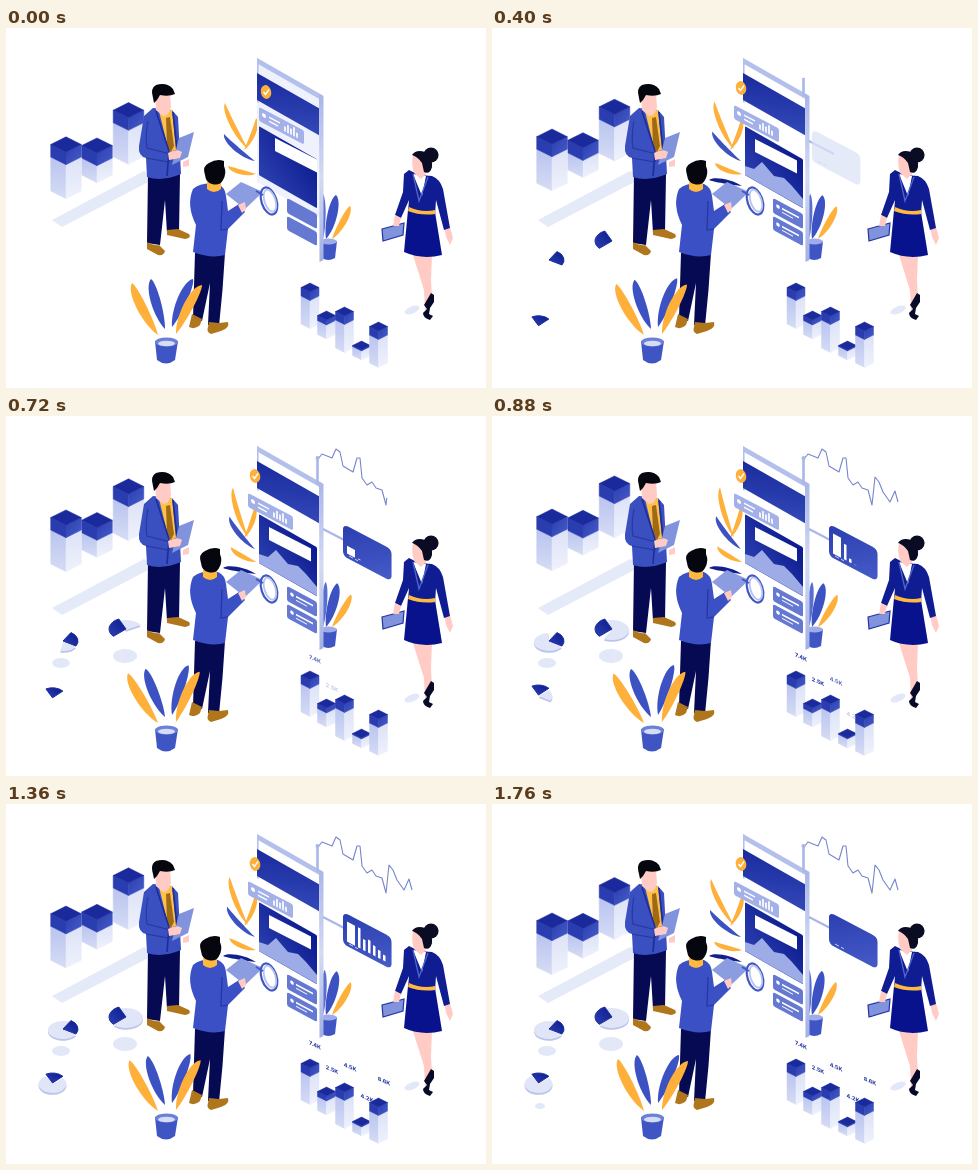
Animation of 480 by 360 pixels, one loop 1840 ms. Source, as an HTML page:

```html
<!DOCTYPE html>
<html lang="en">
<head>
<meta charset="utf-8">
<title>Isometric dashboard</title>
<style>
html,body{margin:0;width:100%;height:100%;overflow:hidden;background:#fff}
svg{display:block;width:100vw;height:100vh}
text{font:bold 5.5px Inter,Arial,sans-serif;fill:#1c2f9f;text-anchor:middle}
</style>
</head>
<body>
<svg viewBox="0 0 480 360">
<defs>
  <linearGradient id="deep" x1="0" y1="0" x2="1" y2="1"><stop stop-color="#1a2b9e"/><stop offset="1" stop-color="#3348b8"/></linearGradient>
  <linearGradient id="deepR" x1="1" y1="0" x2="0" y2="1"><stop stop-color="#0b1a8e"/><stop offset="1" stop-color="#2c40b0"/></linearGradient>
  <linearGradient id="glass" x1="0" y1="0" x2="1" y2="1"><stop stop-color="#2b3eb0"/><stop offset="1" stop-color="#465cc8"/></linearGradient>
  <linearGradient id="post" x1="0" y1="0" x2="0" y2="1"><stop stop-color="#a9b6e8"/><stop offset=".5" stop-color="#d3daf4"/><stop offset="1" stop-color="#a0afe4"/></linearGradient>
  <linearGradient id="side" x1="0" y1="0" x2="0" y2="1"><stop stop-color="#b9c4ef"/><stop offset="1" stop-color="#d6dcf5"/></linearGradient>
  <linearGradient id="sideR" x1="0" y1="0" x2="0" y2="1"><stop stop-color="#dce2f7"/><stop offset="1" stop-color="#eff2fc"/></linearGradient>
</defs>

<path d="M46 192L138 143L150 150L56 199Z" fill="#e5eaf9"/>
<g id="bars"></g>

<g id="man1">
  <path d="M142 146L174 146L173 204L161 205L159 172L154 217L141 215Z" fill="#050a52"/>
  <path d="M141 214Q147 218 153 217L159 223Q158 228 152 227L141 221Z" fill="#b0761c"/>
  <path d="M161 202L172 201L183 206Q186 210 179 211L161 207Z" fill="#b0761c"/>
  <path d="M138 88L147 80L166 82L172 89L175 146Q156 154 141 149L140 130Q132 128 133 118Z" fill="#3a4fc0"/>
  <path d="M153 83L166 82L170 122L163 124Z" fill="#ffc04a"/>
  <path d="M160 90L164 89L168 118L165 124L161 119Z" fill="#a06a14"/>
  <path d="M150 83L163 123L161 148M167 84L171 122" fill="none" stroke="#1c2d98" stroke-width="1.6"/>
  <path d="M142 93Q139 108 141 120L164 126L163 134L140 130" fill="none" stroke="#26389f" stroke-width="1.1"/>
  <path d="M149 66L164 66L165 79Q163 88 157 88L150 82Z" fill="#ffcbc4"/>
  <path d="M147 70Q144 60 150 57Q161 54 167 61L169 66Q163 69 154 67L151 72L148 75Z" fill="#05060e"/>
  <path d="M173 110L188 104L182 129L166 137Z" fill="#8193dc"/>
  <path d="M162 125Q171 120 176 124L174 130L163 132Z" fill="#ffcbc4"/>
  <path d="M177 134L183 131L183 138L177 139Z" fill="#ffcbc4"/>
</g>

<g id="midLeaves"></g>
<g id="sideLeaves"></g>
<path d="M314 213H331L329 230Q322 234 316 230Z" fill="#3f55c4"/>
<ellipse cx="322.5" cy="213.5" rx="8.5" ry="3" fill="#9facea"/>

<g transform="translate(251 30) skewY(29.7)">
  <rect id="sheet" width="63" height="124" fill="#eff2fc"/>
  <rect width="66" height="5.5" rx="1" fill="#b4c0ec"/>
  <rect width="1.6" height="44" fill="#b4c0ec"/>
  <rect y="15" width="62" height="27" fill="url(#deep)"/>
  <rect x="2" y="67" width="58" height="49" rx="1" fill="url(#deepR)"/>
</g>
<path id="hills" d="M253 147V138L262 141L270 134L282 148L292 150L300 158L311 171V180Z" fill="#9dace6"/>
<g id="frame"><rect width="42" height="13" fill="#fff" transform="translate(269 110) skewY(27)"/></g>
<g transform="translate(281 170) skewY(28)">
  <rect width="30" height="15" rx="2" fill="#6578d2"/>
  <rect y="18" width="30" height="14" rx="2" fill="#6578d2"/>
  <g id="rows" fill="#fff">
    <circle cx="5" cy="6" r="1.8"/><rect x="9" y="5" width="17" height="1.8"/><rect x="9" y="9" width="11" height="1"/>
    <circle cx="5" cy="24" r="1.8"/><rect x="9" y="23" width="17" height="1.8"/><rect x="9" y="27" width="11" height="1"/>
  </g>
</g>
<path d="M313 66L317.5 68V232L313.5 234Z" fill="url(#post)"/>
<g id="card">
  <g transform="translate(253 79) skewY(27.5)">
    <rect width="45" height="14" rx="2" fill="#a3b1e8"/>
    <circle cx="5" cy="6" r="2" fill="#fff"/>
    <path d="M10 5H21M10 9H19" stroke="#fff" stroke-width="1.5"/>
    <path d="M26 11V6M29 11V3M32 11V5M35 11V2M38 11V6" stroke="#fff" stroke-width="1.7"/>
  </g>
</g>
<g id="badge">
  <ellipse rx="5.2" ry="7" fill="#ffb03a" transform="rotate(-12)"/>
  <path d="M-2.5 0L-.5 2.5L3 -2.5" fill="none" stroke="#fff" stroke-width="1.4"/>
</g>

<path id="mast" d="M311.5 68V42" fill="none" stroke="#a9b6e8" stroke-width="2.6" pathLength="1" stroke-dasharray="1"/>
<path id="wave" d="M312 43L316 38L326 42L330 33L334 36L337 50L342 53L347 56L351 42L354 42L356 62L361 69L366 66L370 72L376 74L380 89L383 61L387 66L391 76L398 86L403 75L406 86" fill="none" stroke="#7686cc" stroke-width="1.1" stroke-linejoin="round" pathLength="1" stroke-dasharray="1"/>
<circle id="pin" cx="311.5" cy="42" r="2" fill="#a9b6e8"/>
<path id="link" d="M317 113L342 126" stroke="#a9b6e8" stroke-width="2" pathLength="1" stroke-dasharray="1"/>
<g id="callout">
  <g transform="translate(337 108) skewY(27.5)">
    <rect width="48.5" height="32" rx="5" fill="#dde3f7"/>
    <rect id="plate" width="48.5" height="32" rx="5" fill="url(#glass)"/>
    <path d="M6 29H10M12 29H15" stroke="#c5cff3"/>
    <g id="chart" fill="#fff"></g>
  </g>
</g>

<g id="pies"></g>

<g id="man2">
  <path d="M189 225L219 225Q217 262 213 298L202 297L204 255L196 293L187 290Z" fill="#050a52"/>
  <path d="M186 286L196 291L194 297Q189 302 183 299Z" fill="#b0761c"/>
  <path d="M203 294L213 295L222 294Q224 300 215 303L205 306Q200 304 202 299Z" fill="#b0761c"/>
  <path d="M220 166L235 154L257 164L239 181Z" fill="#8b9ce0"/>
  <path d="M187 161Q195 154 212 156Q219 159 220 168L222 183L233 176L239 184L222 201L219 227Q205 231 187 224L190 197Q180 177 187 161Z" fill="#3a50c4"/>
  <path d="M216 173L215 202L222 201" fill="none" stroke="#2436a2" stroke-width="1.2"/>
  <path d="M232 177L239 174L240 181L236 185Z" fill="#ffcbc4"/>
  <g id="head">
    <path d="M197 154L211 155L211 161Q204 167 197 161Z" fill="#ffb93f"/>
    <path d="M195 147Q192 138 199 135Q207 130 214 133L214 138Q217 145 213 152Q210 158 202 156Q196 155 195 147Z" fill="#05060e"/>
  </g>
</g>
<g transform="rotate(-18 263 173)" fill="none">
  <ellipse cx="263" cy="173" rx="7.5" ry="14" fill="#fff" fill-opacity=".75" stroke="#4158c4" stroke-width="2.2"/>
  <ellipse cx="264" cy="173" rx="5.5" ry="11.5" stroke="#b7c3ef" stroke-width="1.8"/>
</g>
<path d="M250 163L257 167" stroke="#4158c4" stroke-width="2"/>

<g id="woman">
  <ellipse cx="406" cy="282" rx="8" ry="3.5" fill="#e3e8f8" transform="rotate(-22 406 282)"/>
  <path d="M406 224L426 226L425 252L426 271L423 282L419 282L418 262Z" fill="#ffcbc4"/>
  <path d="M425 265L428 267L428 274L424 280L423 286L427 288L424 292Q417 290 417 285L421 281L418 277Z" fill="#070a28"/>
  <path d="M438 196L444 199L447 210L444 217L440 209Z" fill="#ffcbc4"/>
  <path d="M402 182L429 184L436 227Q416 232 398 224Z" fill="#07128c"/>
  <path d="M403 142L413 147L426 148Q434 151 437 161L444 200L438 202L430 172L429 187L402 184L403 172L395 190L389 187L397 164L398 146Z" fill="#101d92"/>
  <path d="M407 146L420 148L416 168Z" fill="#fff"/>
  <path d="M407 146L413 173L422 149" fill="none" stroke="#5065cb" stroke-width="1.3"/>
  <path d="M403 179Q416 185 429 182L429 186Q415 188 402 183Z" fill="#ffb93f"/>
  <path d="M407 127L420 129L420 146L415 151L408 145Q405 136 407 127Z" fill="#ffcbc4"/>
  <path d="M406 127Q410 121 419 124Q427 130 426 139Q424 147 418 144L416 135Q412 129 406 127Z" fill="#0a0c24"/>
  <circle cx="425" cy="127" r="7.6" fill="#0a0c24"/>
  <path d="M376 201L398 195L397 207L377 213Z" fill="#8193dc" stroke="#23359f" stroke-width="1.2"/>
  <path d="M389 187L395 190L393 198L387 198Z" fill="#ffcbc4"/>
</g>

<g id="towers"></g>
<g id="labels"></g>

<g id="potLeaves"></g>
<path d="M149 313H172L169 332Q160 339 151 332Z" fill="#3f55c4"/>
<ellipse cx="160.5" cy="314" rx="11.5" ry="4.5" fill="#6d80d8"/>
<ellipse cx="160.5" cy="315.500" rx="8.5" ry="2.8" fill="#d5dcf6"/>
</svg>

<script>
const LOOP = 1840, STEP = 80, ORANGE = '#ffb03a', BLUE = '#3c52c2', NAVY = '#12208c';
const $ = id => document.getElementById(id);

function add(parent, tag, attrs) {
  const el = document.createElementNS('http://www.w3.org/2000/svg', tag);
  for (const k in attrs) el.setAttribute(k, attrs[k]);
  return parent.appendChild(el);
}
const set = (el, k, v) => el.setAttribute(k, v);
const move = (el, x, y) => set(el, 'transform', `translate(${x} ${y})`);

// Eased progress of t between two times.
function ramp(t, from, to) {
  const p = Math.min(1, Math.max(0, (t - from) / (to - from)));
  return p * p * (3 - 2 * p);
}
const cycle = (t, lag = 0) => Math.cos((t - lag) / LOOP * 2 * Math.PI);
const sway = t => (1 - cycle(t)) / 2;

// Column with its top corner at 0,0: half width r, blue cap, pale body.
function prism(parent, x, y, r, cap, body) {
  const g = add(parent, 'g', { transform: `translate(${x} ${y})` }), s = r / 2;
  const face = (d, fill) => add(g, 'path', { d, fill, stroke: fill, 'stroke-width': .5, 'stroke-linejoin': 'round' });
  const wall = (side, top, h, fill) => face(`M0 ${2 * s + top}L${side * r} ${s + top}v${h}L0 ${2 * s + top + h}Z`, fill);
  wall(-1, cap, body, 'url(#side)');
  wall(1, cap, body, 'url(#sideR)');
  wall(-1, 0, cap, '#2a3db0');
  wall(1, 0, cap, 'url(#glass)');
  face(`M0 0L${r} ${s}L0 ${2 * s}L${-r} ${s}Z`, '#1a2a9c');
  return g;
}

// Leaf from base to tip, bulging by w, bent sideways by b, turning by a.
function leaf(parent, bx, by, tx, ty, w, b, a, fill) {
  const dx = tx - bx, dy = ty - by, n = Math.hypot(dx, dy), ux = -dy / n, uy = dx / n;
  const at = (f, o) => `${(bx + dx * f + ux * o).toFixed(1)} ${(by + dy * f + uy * o).toFixed(1)}`;
  const d = `M${bx} ${by}C${at(.3, b + w)} ${at(.9, b + w)} ${tx} ${ty}C${at(.9, b - w)} ${at(.3, b - w)} ${bx} ${by}Z`;
  return { el: add(parent, 'path', { d, fill }), bx, by, a };
}

// Elliptic pie slice, angles in degrees.
function slice(cx, cy, rx, ry, a, b) {
  const pt = v => `${cx + rx * Math.cos(v * Math.PI / 180)} ${cy + ry * Math.sin(v * Math.PI / 180)}`;
  return `M${cx} ${cy}L${pt(a)}A${rx} ${ry} 0 ${b - a > 180 ? 1 : 0} 1 ${pt(b)}Z`;
}

const bars = [[122.5, 67, 34, 100], [91, 102, 17, 40], [60, 101, 34, -60]].map(([x, y, body, lag]) =>
  ({ el: prism($('bars'), x, y, 15.3, 12.5, body), x, y, lag }));

[[304, 255, 8.5, 28], [320.5, 283, 5, 14], [338.5, 279, 8.5, 28], [355.5, 313, 1, 9], [372.5, 294, 8.5, 28]]
  .forEach(([x, y, cap, body]) => prism($('towers'), x, y, 9, cap, body));

const mid = $('midLeaves'), sideL = $('sideLeaves'), pot = $('potLeaves');
const navyLeaf = leaf(mid, 250, 158, 217, 152, 3, 2, 0, NAVY);
const leaves = [
  leaf(mid, 242, 121, 219, 75, 3.4, -4, 11, ORANGE),
  leaf(mid, 238, 122, 250, 90, 3.2, 4, -3, ORANGE),
  leaf(mid, 249, 133, 218, 106, 3.4, -4, 12, BLUE),
  leaf(mid, 250, 146, 222, 138, 3.2, -3, 16, ORANGE),
  leaf(sideL, 320, 211, 330, 167, 6.5, 1, 2, BLUE),
  leaf(sideL, 317, 211, 317, 166, 3.5, 0, 4, '#5a6ed0'),
  leaf(sideL, 326, 211, 344, 178, 4.5, 2, 2, ORANGE),
  leaf(pot, 159, 301, 145, 251, 6.5, -2, -7, BLUE),
  leaf(pot, 166, 299, 187, 251, 6.5, -2, -6, BLUE),
  leaf(pot, 152, 307, 126, 255, 6.5, -3, -5, ORANGE),
  leaf(pot, 170, 306, 196, 257, 6.5, -3, -3, ORANGE)
];

const chart = [[4, 8, 20], [15, 2.5, 20], [20, 2.5, 11], [25, 2.5, 13], [30, 2.5, 10], [35, 2.5, 8], [40, 2.5, 6]].map(([x, w, h], i) =>
  ({ el: add($('chart'), 'rect', { x, width: w }), h, start: 600 + i * 85 }));

const labels = [['7.4K', 309, 243], ['2.5K', 326, 267.5], ['4.5K', 344, 265], ['4.2K', 361, 296], ['8.6K', 378, 279]].map(([s, x, y], i) => {
  const el = add($('labels'), 'text', {});
  el.textContent = s;
  return { el, x, y, start: 560 + i * 80 };
});

// Centre, radii, wedge angles, wedge and disc timing, rise, shadow.
const pies = [
  [57, 226, 15, 9, -58, 30, 240, 560, 600, 14, [55, 247, 9, 5], 480],
  [120, 214, 17, 10, 138, 245, 120, 400, 580, 14, [119, 240, 12, 7], 440],
  [46.5, 280, 14, 9, -118, -42, 200, 860, 760, 24, [48, 302, 5, 3], 1500]
].map(([cx, cy, rx, ry, a, b, from, to, disc, rise, sh, shAt]) => {
  const g = $('pies'), path = fill => add(g, 'path', { fill });
  const shadow = add(g, 'ellipse', { cx: sh[0], cy: sh[1], fill: '#e3e8f8' });
  const edge = path('#b9c4ec'), top = path('#e0e6f7');
  const wedge = add(g, 'path', { d: slice(cx, cy - 1, rx, ry + 1, a, b), fill: 'url(#deepR)', stroke: '#1d2fa0', 'stroke-width': 1, 'stroke-linejoin': 'round' });
  return t => {
    const p = ramp(t, from, to), q = ramp(t, disc, disc + 360), s = ramp(t, shAt, shAt + 260);
    const k = Math.min(1, p * 6);
    set(wedge, 'transform', `translate(${cx} ${cy + rise * (1 - p)}) scale(${k}) translate(${-cx} ${-cy})`);
    const end = b + (359.9 - b + a) * q;
    set(top, 'd', q ? slice(cx, cy, rx, ry, b, end) : '');
    set(edge, 'd', q ? slice(cx, cy + 1.8, rx, ry, b, end) : '');
    set(shadow, 'rx', sh[2] * s);
    set(shadow, 'ry', sh[3] * s);
  };
});

const draw = (id, p) => {
  set($(id), 'stroke-dashoffset', 1 - p);
  set($(id), 'visibility', p > 0 ? 'visible' : 'hidden');
};

function render(t) {
  for (const b of bars) move(b.el, b.x, b.y + 8 * cycle(t, b.lag));
  for (const l of leaves) set(l.el, 'transform', `rotate(${l.a * sway(t)} ${l.bx} ${l.by})`);
  set(navyLeaf.el, 'opacity', ramp(t, 40, 300));

  const open = ramp(t, 60, 360);
  set($('sheet'), 'opacity', 1 - open);
  move($('card'), -11 * open, -2 * open);
  move($('badge'), 260 - 11 * open, 64 - 4 * open);
  move($('frame'), -6 * open, open);
  set($('rows'), 'opacity', open);
  const grow = ramp(t, 120, 400);
  set($('hills'), 'opacity', grow);
  set($('hills'), 'transform', `translate(0 ${14 * (1 - grow)})`);
  move($('head'), 4 * (1 - ramp(t, 0, 260)), 0);

  draw('mast', ramp(t, 260, 480));
  draw('link', ramp(t, 200, 400));
  draw('wave', ramp(t, 500, 860));
  set($('pin'), 'opacity', ramp(t, 420, 520));

  const out = ramp(t, 240, 540);
  move($('callout'), -38 * (1 - out), -15 * (1 - out));
  set($('callout'), 'opacity', ramp(t, 240, 480));
  set($('plate'), 'opacity', ramp(t, 400, 540));
  for (const c of chart) {
    const h = c.h * ramp(t, c.start, c.start + 280) * (1 - ramp(t, 1480, 1720));
    set(c.el, 'y', 27.5 - h);
    set(c.el, 'height', h);
  }
  for (const l of labels) {
    const p = ramp(t, l.start, l.start + 240);
    set(l.el, 'opacity', p);
    set(l.el, 'transform', `translate(${l.x} ${l.y + 8 * (1 - p)}) skewY(24)`);
  }
  for (const pie of pies) pie(t);
}

const began = performance.now();
function tick() {
  const t = (performance.now() - began) % LOOP;
  render(Math.floor(t / STEP) * STEP);
  requestAnimationFrame(tick);
}
tick();
</script>
</body>
</html>
```
